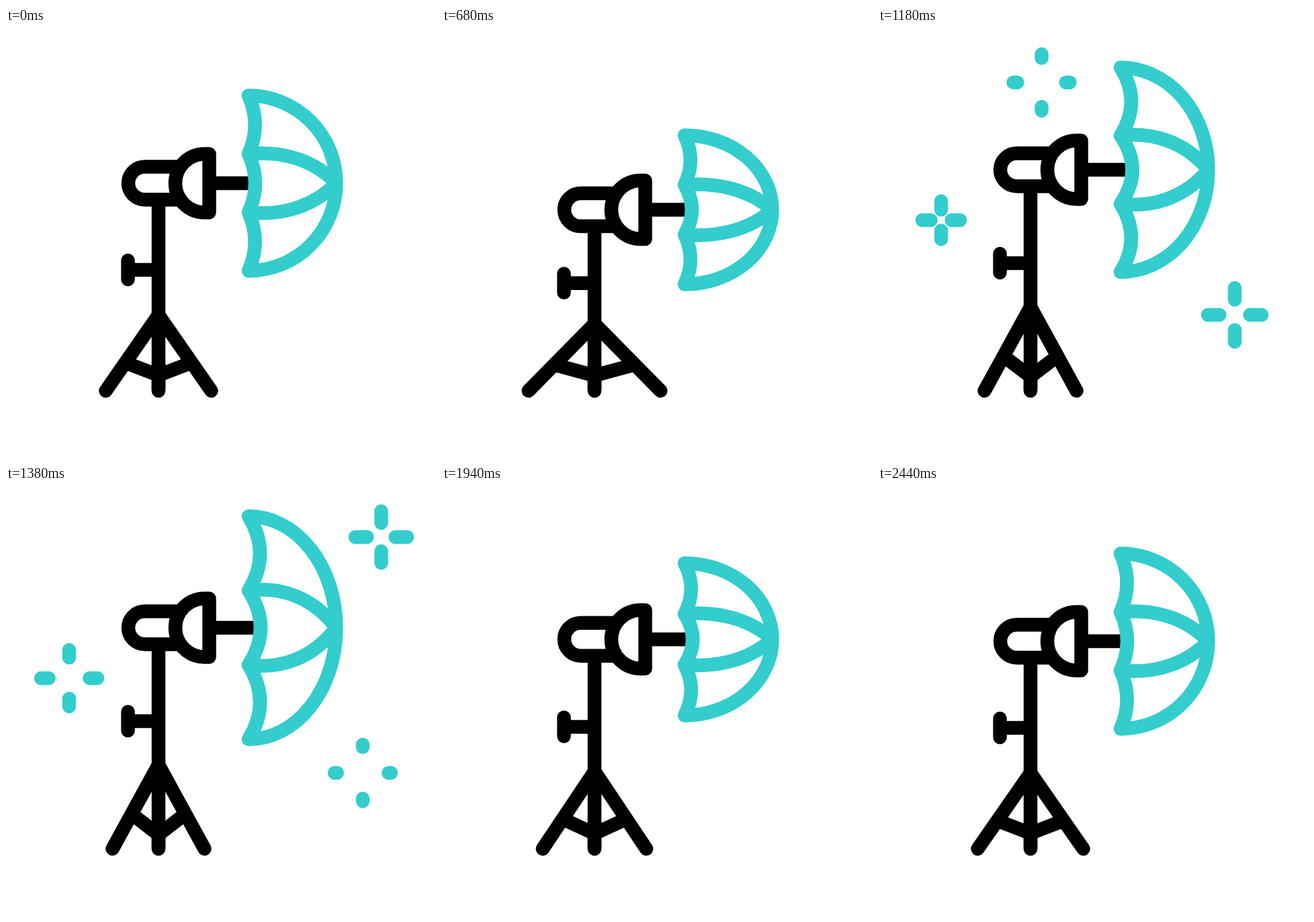
Recreate the animation shown at these times as an HTML page. Size 640 px wide and 640 px high, loop 2.64 s.

```html
<!DOCTYPE html>
<html lang="en">
<head>
<meta charset="utf-8">
<title>Studio light</title>
<style>
  html, body { margin: 0; width: 100%; height: 100%; overflow: hidden; background: #fff; }
  svg { display: block; width: 100%; height: 100%; }
  path { fill: none; stroke: #000; stroke-width: 20.5; stroke-linejoin: round; }
  .round { stroke-linecap: round; }
  .teal { stroke: #33cdcd; }
</style>
</head>
<body>
<svg viewBox="0 0 640 640">
  <path id="legs" class="round"/>
  <path id="brace"/>
  <path id="pole"/>
  <path class="round" d="M227 500V540"/>
  <path id="arm"/>
  <path id="knob" class="round"/>
  <path id="lamp"/>
  <path id="umbrella" class="teal round"/>
  <path id="sparks" class="teal round"/>
</svg>
<script>
const LOOP = 2640;

const clamp = v => Math.min(1, Math.max(0, v));
const put = (id, d) => document.getElementById(id).setAttribute('d', d);

// Eased 0 to 1 between two times
function ease(t, from, to) {
  const u = clamp((t - from) / (to - from));
  return u * u * (3 - 2 * u);
}

// Crouch, jump, hang, then a smaller crouch that settles
const dropAt = t => 52 * ease(t, 220, 520) - 72 * ease(t, 520, 1130)
  + 36 * ease(t, 1450, 1790) - 19 * ease(t, 1790, 1950) + 3 * ease(t, 1950, 2240);

// The umbrella squeezes and opens a little after the crouches
const spanAt = t => 130.5 - 20 * ease(t, 220, 540) + 57 * ease(t, 640, 1460)
  - 58 * ease(t, 1530, 1860) + 40 * ease(t, 1890, 2160) - 19 * ease(t, 2160, 2440);

const bendAt = t => ease(t, 520, 1280) - ease(t, 1600, 2120);

function drawStand(drop, bend) {
  const y = 231 + drop;
  const apex = 427 + 0.35 * drop - 5 * bend;
  const half = 78.5 + 0.5 * drop;
  const braceY = 498 + 0.1 * drop - 8 * bend;
  const reach = half * (braceY - apex) / (540 - apex);
  const grip = 360 + drop / 2;
  put('legs', `M${227 - half} 540L227 ${apex}L${227 + half} 540`);
  put('brace', `M${227 - reach} ${braceY}L227 ${517 + 2 * bend}L${227 + reach} ${braceY}`);
  put('pole', `M227 ${y + 24.5}V540`);
  put('arm', `M181.5 ${grip}H227`);
  put('knob', `M181.5 ${grip - 14}v28`);
  put('lamp', `M257 ${y - 24.5}H206.5a24.5 24.5 0 0 0 0 49H257`
    + `M302.5 ${y - 43.5}v87h-7a43.5 43.5 0 0 1 0 -87z`
    + `M302.5 ${y}H${371 + 8 * bend}`);
}

function drawUmbrella(y, h, bend) {
  const tip = 361, hub = 491.5, third = h / 3;
  const scallop = depth => `q${2 * depth} ${-third} 0 ${-2 * third}`;
  const side = scallop(0.07 * h + 0.5 + 5 * bend);
  const middle = scallop(10 + 8 * bend);
  const rib = s => `M${tip} ${y + s * third}C405 ${y + s * h * 0.37} 455 ${y + s * h * 0.29} ${hub} ${y}`;
  put('umbrella', `M${tip} ${y - h}A130.5 ${h} 0 0 1 ${tip} ${y + h}`
    + side + middle + side + 'z' + rib(-1) + rib(1));
}

// Four dashes fly out; their tails catch up with their heads
function spark(x, y, age) {
  if (age < 0 || age > 410) return '';
  const head = 15.5 + 26.5 * (1 - (1 - clamp(age / 220)) ** 2);
  const tail = 15.5 + 26.5 * clamp((age - 70) / 340);
  let d = '';
  for (const [dx, dy] of [[1, 0], [-1, 0], [0, 1], [0, -1]]) {
    d += `M${x + dx * tail} ${y + dy * tail}L${x + dx * head} ${y + dy * head}`;
  }
  return d;
}

function draw(t) {
  const drop = dropAt(t), bend = bendAt(t);
  drawStand(drop, bend);
  drawUmbrella(231 + drop, spanAt(t), bend);
  put('sparks', spark(243.5, 81, t - 845) + spark(531, 427, t - 1020)
    + spark(94, 286, t - 1120) + spark(558.5, 76, t - 1240));
}

const begin = performance.now();
function tick() {
  draw((performance.now() - begin) % LOOP);
  requestAnimationFrame(tick);
}
tick();
</script>
</body>
</html>
```
